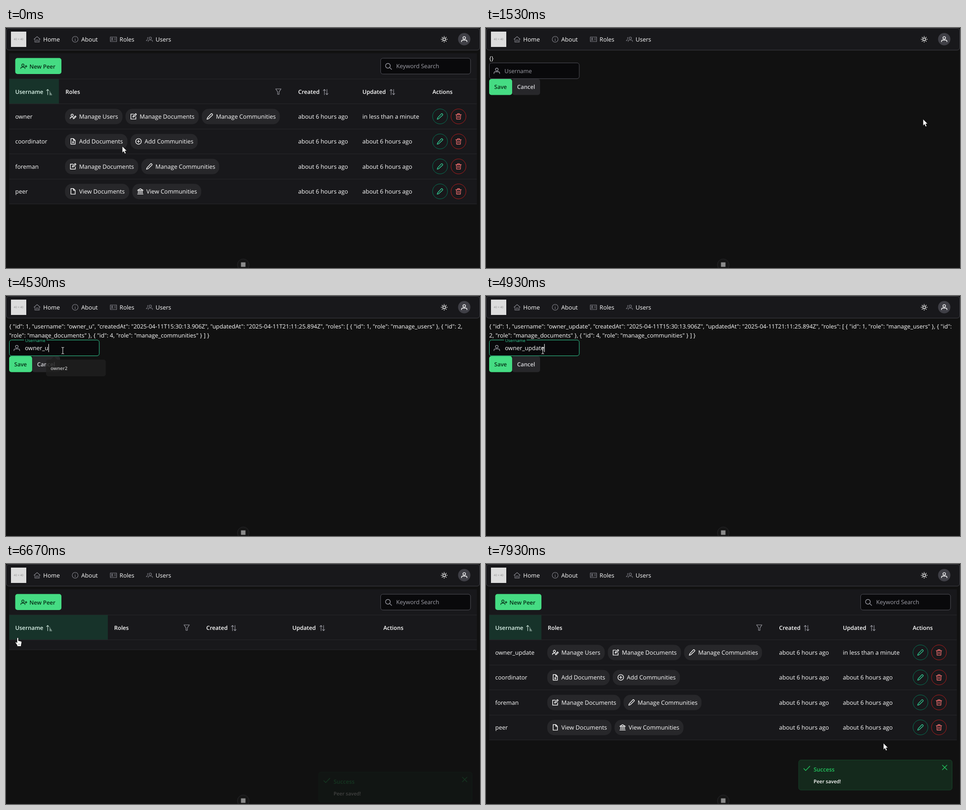
Write an HTML page that moves like this. It is 1052 px wide and 532 px high and loops after 8000 ms.

```html
<!DOCTYPE html>
<html lang="en">
<head>
<meta charset="utf-8">
<title>Accounts</title>
<style>
html, body { margin: 0; width: 100%; height: 100%; overflow: hidden; background: #111; }
svg { display: block; width: 1052px; height: 532px; }
text { font-family: "Open Sans", "Noto Sans", sans-serif; white-space: pre; text-rendering: geometricPrecision; }
.icon { fill: none; stroke: currentColor; stroke-linecap: round; stroke-linejoin: round; }
</style>
</head>
<body>
<svg id="stage" viewBox="0 0 1052 532"></svg>
<script>
const LOOP = 8000, FPS = 15;
const GREEN = '#45dc83', MINT = '#34d399', GREY = '#a1a1aa', PANEL = '#18181b', LINE = '#29292c', INK = '#052e16';

const ICONS = {
  home: 'M-7 0 0-6 7 0M-5-1.5V6.2H5V-1.5M-2 6.2V1.5H2V6.2',
  info: 'M-6.5 0a6.5 6.5 0 1 0 13 0a6.5 6.5 0 1 0-13 0M0-.5V3.4M0-3.3V-2.9',
  card: 'M-7-5H7V5H-7ZM-4.3-1.6a1.3 1.3 0 1 0 2.6 0a1.3 1.3 0 1 0-2.6 0M-5 2.4Q-3 .4-1 2.4M2-2H5M2 1H5',
  people: 'M-.7-2.5a2.5 2.5 0 1 0 5 0a2.5 2.5 0 1 0-5 0M-3 5V4.2Q-3 1.8-.5 1.8H4.2Q6.6 1.8 6.6 4.2V5M-3-4.2a2 2 0 0 0-.3 3.8M-7 3.6Q-7 1.4-4.6 1.4',
  sun: 'M-3 0a3 3 0 1 0 6 0a3 3 0 1 0-6 0M0-6.6V-5.4M0 6.6V5.4M-6.6 0H-5.4M6.6 0H5.4M-4.6-4.6-3.8-3.8M4.6 4.6 3.8 3.8M-4.6 4.6-3.8 3.8M4.6-4.6 3.8-3.8',
  person: 'M-3-3a3 3 0 1 0 6 0a3 3 0 1 0-6 0M-6.3 6V5Q-6.3 2-3.3 2H3.3Q6.3 2 6.3 5V6',
  personPlus: 'M-4.6-2.6a2.6 2.6 0 1 0 5.2 0a2.6 2.6 0 1 0-5.2 0M-6.6 5V4.3Q-6.6 1.8-4.2 1.8H.2Q2.6 1.8 2.6 4.3V5M5-2.4V2M2.9-.2H7.1',
  personEdit: 'M-4.6-2.6a2.6 2.6 0 1 0 5.2 0a2.6 2.6 0 1 0-5.2 0M-6.6 5V4.3Q-6.6 1.8-4.2 1.8H-1M5.4-1.2 7 .4 2.4 5 .4 5.4.8 3.4Z',
  search: 'M-6.3-1.2a5 5 0 1 0 10 0a5 5 0 1 0-10 0M2.4 2.5 6.5 6.5',
  sortUp: 'M-3 6V-6M-5.6-3.2-3-6-.4-3.2M1.5-1.2H2M1.5 1.2H3.4M1.5 3.6H4.8M1.5 6H6.2',
  sort: 'M-2.8 6V-6M-5.4-3.2-2.8-6-.2-3.2M2.8-6V6M.2 3.2 2.8 6 5.4 3.2',
  filter: 'M-6-6H6L1.6.4V6H-1.6V.4Z',
  pencil: 'M3.2-6.2Q4.2-7 5.2-6L6-5.2Q7-4.2 6.2-3.2L-3 5.4-6.6 6.6-5.4 3Z',
  edit: 'M0-5.4H-6.2V6.2H5.4V1M5-6.6 6.8-4.8 1 1-1.6 1.6-1-1Z',
  trash: 'M-6.5-4H6.5M-2.4-4V-6.3H2.4V-4M-5-4-4.4 6.4H4.4L5-4M-1.6-.8V3.2M1.6-.8V3.2',
  file: 'M1-6.5H-5V6.5H5V-2.5ZM1-6.5V-2.5H5',
  filePlus: 'M1-6.5H-5V6.5H5V-2.5ZM1-6.5V-2.5H5M0-.4V4M-2.2 1.8H2.2',
  plus: 'M-6.6 0a6.6 6.6 0 1 0 13.2 0a6.6 6.6 0 1 0-13.2 0M0-3V3M-3 0H3',
  bank: 'M-6.5-2.5 0-6.4 6.5-2.5ZM-4.6-.8V4M-1.5-.8V4M1.5-.8V4M4.6-.8V4M-6.5 6.2H6.5',
  check: 'M-6.4.4-2.4 4.6 6.4-4.6',
  close: 'M-5-5 5 5M5-5-5 5'
};

const text = (x, y, s, size = 13, weight = 400, fill = '#fff', extra = '') =>
  `<text x="${x}" y="${y}" font-size="${size}" font-weight="${weight}" fill="${fill}" ${extra}>${s}</text>`;
const bold = (x, y, s, fill = '#fff', extra = '') => text(x, y, s, 12.5, 600, fill, extra);
const box = (x, y, w, h, fill, r = 0, stroke = 'none', extra = '') =>
  `<rect x="${x}" y="${y}" width="${w}" height="${h}" rx="${r}" fill="${fill}" stroke="${stroke}" ${extra}/>`;
const icon = (name, x, y, color = '#fff', scale = 1, weight = 1.3) =>
  `<path class="icon" d="${ICONS[name]}" color="${color}" stroke-width="${weight}" transform="translate(${x} ${y}) scale(${scale})"/>`;
const group = (id, body, extra = '') => `<g id="${id}" ${extra}>${body}</g>`;
const MID = 'text-anchor="middle"';

function navBar() {
  const links = [['home', 69, 'Home'], ['info', 153.5, 'About'], ['card', 238.5, 'Roles'], ['people', 318.5, 'Users']];
  return box(.5, .5, 1051, 48.5, PANEL, 6, '#414147') +
    box(11, 8, 34, 34, '#ddd') + text(28, 27, '40 × 40', 6.3, 400, '#8c8c8c', MID) +
    links.map(([i, x, s]) => icon(i, x, 25, '#85858d', 1, 1.1) + text(x + 13.6, 29.7, s)).join('') +
    icon('sun', 972.5, 25, '#fff', 1, 1.4) +
    '<circle cx="1017" cy="24.8" r="13.7" fill="#3f3f46"/>' + icon('person', 1017, 24.8, '#fff', .95, 1.5);
}

function badge() {
  return '<circle cx="526.5" cy="525" r="13" fill="#151515" stroke="#29292b"/>' + box(521.5, 519.5, 10, 10, '#8b8b8b');
}

const CHIPS = {
  MU: ['personEdit', 'Manage Users', 127.5], MD: ['edit', 'Manage Documents', 162.5], MC: ['pencil', 'Manage Communities', 173],
  AD: ['filePlus', 'Add Documents', 138.5], AC: ['plus', 'Add Communities', 149],
  VD: ['file', 'View Documents', 142.5], VC: ['bank', 'View Communities', 153]
};

function chipRow(x, cy, keys) {
  return keys.map(k => {
    const [i, label, w] = CHIPS[k];
    const out = box(x, cy - 17, w, 34, '#27272a', 15) + icon(i, x + 17.8, cy - .3, '#fff', .95, 1.5) + text(x + 31.3, cy + 4.6, label);
    x += w + 6.8;
    return out;
  }).join('');
}

function listView(c, rows) {
  const end = rows.length ? 390 : 190;
  const rule = y => box(7, y - .5, 1038, 1, LINE);
  let out = box(7, 56, 1038, end - 56, PANEL) + rule(113) +
    box(20.5, 66.5, 102.5, 35.5, GREEN, 5) + icon('personPlus', 39.5, 85, INK, 1, 1.4) + bold(52, 89.5, 'New Peer', INK) +
    box(831.5, 67, 199.5, 35, '#09090b', 5, '#52525b') + icon('search', 849, 85, GREY, 1.05, 1.3) +
    text(866, 89.4, 'Keyword Search', 12.8, 400, GREY) +
    box(7, 113, c.sortEnd - 7, 55, '#17332a') + rule(168) + rule(end) +
    bold(20.5, 146, 'Username', '#dcf5ea') + icon('sortUp', 95.5, 142, '#cfe6dc', 1, 1.1) +
    bold(c.roles + .5, 146, 'Roles') + icon('filter', c.filter, 141, GREY, 1, 1.1) +
    bold(c.created, 146, 'Created') + icon('sort', c.created + 61, 142, GREY, 1, 1.1) +
    bold(c.updated, 146, 'Updated') + icon('sort', c.updated + 66.5, 142, GREY, 1, 1.1) +
    bold(c.actions, 146, 'Actions');
  rows.forEach(([name, keys], i) => {
    const cy = 196.3 + i * 55.4, base = cy + 4.7;
    if (i) out += rule(Math.round(168 + i * 55.5));
    out += text(20.5, base, name) + chipRow(c.roles - .5, cy, keys) +
      text(c.created, base, 'about 6 hours ago') +
      text(c.updated, base, i ? 'about 6 hours ago' : 'in less than a minute') +
      `<circle ${i ? '' : 'class="firstEdit"'} cx="${c.edit}" cy="${cy - .3}" r="16.6" fill="transparent" stroke="#047857"/>` +
      icon('pencil', c.edit, cy - .3, MINT, .95, 1.4) +
      `<circle cx="${c.edit + 41}" cy="${cy - .3}" r="16.6" fill="none" stroke="#b91c1c"/>` +
      icon('trash', c.edit + 41, cy - .3, '#f87171', .95, 1.4);
  });
  return out;
}

const NAME = 'owner';
const rowsFor = name => [[name, ['MU', 'MD', 'MC']], ['coordinator', ['AD', 'AC']], ['foreman', ['MD', 'MC']], ['peer', ['VD', 'VC']]];
const COLS = {
  before: { sortEnd: 117.5, roles: 131.5, filter: 604.5, created: 648.5, updated: 791, actions: 946.5, edit: 963.3 },
  empty: { sortEnd: 226, roles: 239.5, filter: 401, created: 444.5, updated: 635.5, actions: 837.5 },
  after: { sortEnd: 123, roles: 136.5, filter: 606.5, created: 650.5, updated: 792, actions: 947, edit: 964.3 }
};

const formView =
  text(7, 71.6, '', 12.93, 400, '#fff', 'id="json1"') + text(7, 92.2, '', 12.93, 400, '#fff', 'id="json2"') +
  group('fields',
    box(7.5, 77.3, 199.5, 35, '#09090b', 5, '#52525b', 'id="field"') + icon('person', 24, 95, GREY, 1, 1.3) +
    text(42, 99.6, '', 13, 400, '#fff', 'id="value"') +
    box(40, 72, 50, 11, '#09090b', 2, 'none', 'id="labelBack"') +
    text(41, 99.6, 'Username', 12.6, 500, GREY, 'id="label"') +
    box(0, 86, 1.1, 18, '#fff', 0, 'none', 'id="caret"') +
    box(58, 113, 62, 35.5, '#27272a', 5, 'none', 'id="cancel"') + bold(89, 135.3, 'Cancel', '#d9d9dd', MID) +
    box(7, 113, 51, 35.5, GREEN, 5, 'none', 'id="save"') + bold(32.3, 135.3, 'Save', INK, MID)) +
  group('suggest',
    '<path d="M99 141 106.5 134.5 114 141Z" fill="#1f1f1f"/>' +
    box(89, 141, 132.5, 68, '#1f1f1f', 5, 'none', 'id="menu"') +
    text(99, 163.5, '', 10.3, 600, '#e8e8e8', 'id="hint1"') + text(99, 194, '', 10.3, 600, '#e8e8e8', 'id="hint2"'));

const toastView = box(694, 434.5, 340.5, 66.5, '#14291c', 5, '#17452a') +
  icon('check', 712, 453, '#22c55e', 1.05, 1.4) + bold(727, 460, 'Success', '#22c55e') +
  text(727, 486, 'Peer saved!', 11, 600) + icon('close', 1018, 451, '#22c55e', 1, 1.4);

const pointerView =
  group('arrow', '<path d="M0 0V14.5L3.3 11.5 5.6 16.8 8.2 15.6 5.9 10.5H10.3Z" fill="#fff" stroke="#111" stroke-width=".8"/>') +
  group('hand', '<path d="M-1.5 1.2Q0-.6 1.5 1.2V7L7.4 8.4Q9 9 8.8 10.8L7.6 16.5V19.5H-1.2V17L-5 11.5Q-5.4 9.5-3.5 10L-1.5 11.8Z" fill="#fff" stroke="#111" stroke-width=".8"/><path d="M2 13.5V16.5M4.2 13.5V16.5" stroke="#555" stroke-width=".8"/>') +
  group('beam', '<path d="M-3-7H-1L0-6.3 1-7H3M0-6.3V6.3M-3 7H-1L0 6.3 1 7H3" fill="none" stroke="#e8e8e8" stroke-width="1.1"/>');

document.getElementById('stage').innerHTML = box(0, 0, 1052, 532, '#111') + navBar() +
  group('before', listView(COLS.before, rowsFor(NAME))) +
  group('empty', listView(COLS.empty, [])) +
  group('after', listView(COLS.after, rowsFor(NAME + '_update'))) +
  group('form', formView) + badge() + group('toast', toastView) + group('pointer', pointerView);

const $ = id => document.getElementById(id);
const show = (id, on) => $(id).setAttribute('display', on ? 'inline' : 'none');
const set = (id, attrs) => { for (const k in attrs) $(id).setAttribute(k, attrs[k]); };
const clamp = v => Math.max(0, Math.min(1, v));
const ramp = (t, from, length) => clamp((t - from) / length);
const inside = (x, y, l, top, r, b) => x >= l && x <= r && y >= top && y <= b;

// Moments in ms
const OPEN = 1467, LOADED = 1600, FOCUS = 2667, FILTER = 4333, CLOSED = 6467, ROWS = 6800;
const KEYS = [[4267, '_'], [4533, 'u'], [4600, 'p'], [4667, 'd'], [4800, 'a'], [4867, 't'], [4933, 'e']];
const PATH = [
  [0, 258, 262], [200, 320, 238], [400, 530, 186], [533, 690, 178], [733, 885, 218], [867, 932, 240],
  [933, 934, 239], [1133, 962, 208], [1267, 970, 202], [1533, 970, 202], [1667, 930, 196], [1867, 640, 160],
  [2067, 300, 122], [2267, 134, 112], [2333, 134, 112], [2467, 125, 121], [3533, 125, 121], [3733, 126, 121],
  [5400, 126, 121], [5667, 70, 146], [5867, 25, 170], [6000, 25, 170], [6200, 26, 163], [7067, 26, 163],
  [7267, 150, 200], [7467, 480, 330], [7667, 840, 440], [7733, 905, 449], [7933, 882, 397]
];

function pointerAt(t) {
  const n = PATH.findIndex(p => p[0] > t);
  if (n < 0) return PATH[PATH.length - 1].slice(1);
  const [a, b] = [PATH[n - 1], PATH[n]], k = (t - a[0]) / (b[0] - a[0]);
  return [a[1] + (b[1] - a[1]) * k, a[2] + (b[2] - a[2]) * k];
}

function jsonLines(name, typed) {
  const all = `{ "id": 1, "username": "${name}", "createdAt": "2025-04-11T15:30:13.906Z", "updatedAt": "2025-04-11T21:11:25.894Z", ` +
    '"roles": [ { "id": 1, "role": "manage_users" }, { "id": 2, "role": "manage_documents" }, { "id": 4, "role": "manage_communities" } ] }';
  const wrap = typed === 0 ? '"manage_documents"' : typed < 7 ? '"role": "manage_documents"' : '2, "role"';
  const at = all.indexOf(wrap);
  return [all.slice(0, at).trim(), all.slice(at)];
}

function drawForm(t, x, y) {
  const loaded = t >= LOADED, focus = t >= FOCUS;
  const keys = KEYS.filter(k => k[0] <= t);
  const name = loaded ? NAME + keys.map(k => k[1]).join('') : '';
  const [first, second] = loaded ? jsonLines(name, keys.length) : ['{}', ''];
  $('json1').textContent = first;
  $('json2').textContent = second;
  $('value').textContent = name;
  set('fields', { transform: `translate(0 ${loaded ? 20.3 : 0})` });

  const up = ramp(t, LOADED, 200);
  set('label', { y: 99.6 - 18.3 * up, x: 41 + 1.5 * up, 'font-size': 12.6 - 3.3 * up, fill: focus ? MINT : GREY });
  show('labelBack', up > .5);
  set('field', { stroke: focus ? MINT : '#52525b' });

  const since = keys.length ? keys[keys.length - 1][0] : FOCUS;
  show('caret', focus && (t - since) % 1060 < 530);
  set('caret', { x: 42 + (name ? $('value').getComputedTextLength() : 0) });

  const narrowed = t >= FILTER;
  set('suggest', { opacity: Math.min(ramp(t, 2667, 200), 1 - ramp(t, 4500, 200)) });
  set('menu', { height: narrowed ? 37 : 68 });
  $('hint1').textContent = narrowed ? NAME + '2' : NAME;
  $('hint2').textContent = narrowed ? '' : NAME + '2';

  const overSave = inside(x, y, 7, 133, 58, 169), overCancel = inside(x, y, 58, 133, 120, 169);
  set('save', { fill: overSave ? '#86efac' : GREEN });
  set('cancel', { fill: overCancel ? '#3f3f46' : '#27272a' });
  if (overSave || overCancel) return 'hand';
  return inside(x, y, 7, 97, 207, 133) ? 'beam' : 'arrow';
}

function draw(ms) {
  const t = Math.round(Math.floor((ms + 5) * FPS / 1000) * 1000 / FPS);
  const view = t < OPEN ? 'before' : t < CLOSED ? 'form' : t < ROWS ? 'empty' : 'after';
  const [x, y] = pointerAt(t);
  ['before', 'form', 'empty', 'after'].forEach(v => show(v, v === view));

  let kind = 'arrow';
  if (view === 'form') kind = drawForm(t, x, y);
  else {
    const overEdit = view === 'before' && Math.hypot(x - 963.3, y - 196) < 16.6;
    document.querySelector('#before .firstEdit').setAttribute('fill', overEdit ? 'rgba(52,211,153,.06)' : 'transparent');
    if (overEdit || inside(x, y, 7, 113, COLS[view].sortEnd, 168)) kind = 'hand';
  }

  const rise = ramp(t, 6600, 333);
  set('toast', { opacity: rise, transform: `translate(0 ${33.5 * (1 - rise)})` });
  set('pointer', { transform: `translate(${x} ${y})` });
  ['arrow', 'hand', 'beam'].forEach(k => show(k, k === kind));
}

const start = performance.now();
function tick() {
  draw((performance.now() - start) % LOOP);
  requestAnimationFrame(tick);
}
tick();
</script>
</body>
</html>
```
